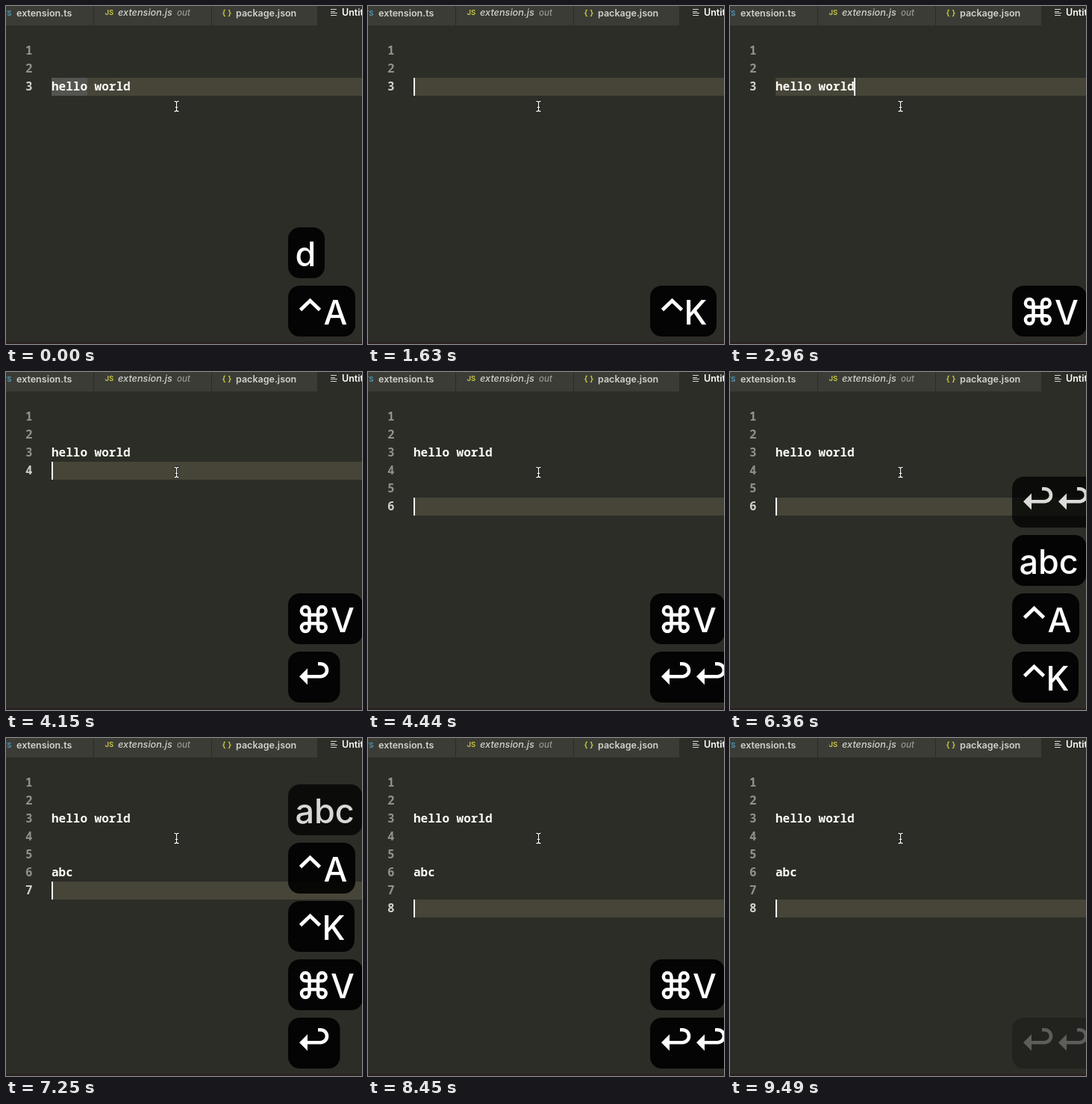
Write an HTML page that moves like this. It is 477x452 px and loops after 9590 ms.

```html
<!DOCTYPE html>
<html lang="en">
<head>
<meta charset="utf-8">
<title>Editor key demo</title>
<style>
  html, body { margin: 0; width: 100%; height: 100%; overflow: hidden; background: #2c2d27; }
  svg { display: block; width: 477px; height: 452px; }
  text { white-space: pre; }
  .tab { font: 600 12.5px Inter, "Open Sans", sans-serif; fill: #d2d2cd; }
  .slant { font-style: italic; font-weight: 500; font-size: 12.7px; }
  .dim { font-size: 11.5px; fill: #989993; }
  .icon { font: 600 9.5px Inter, sans-serif; }
  .code { font: 600 16px "Noto Sans Mono", "DejaVu Sans Mono", monospace; fill: #fbfbf5; }
  .num { fill: #90918b; text-anchor: end; }
  .num.on { fill: #d0d0cb; }
  .key { font: 500 45px Inter, "Open Sans", sans-serif; fill: #fff; }
  .line { fill: none; stroke: #fff; }
</style>
</head>
<body>
<svg viewBox="0 0 477 452" xmlns="http://www.w3.org/2000/svg">
  <defs>
    <path id="beam" d="M225.8 127.3q2.7 0 2.7 2q0-2 2.7-2M228.5 129V139M225.8 140.9q2.7 0 2.7-2q0 2 2.7 2M227 135.5h3"/>
  </defs>
  <rect width="477" height="452" fill="#2c2d27"/>
  <rect width="417" height="26" fill="#3b3c36"/>
  <path d="M117.5 0V26M275.5 0V26M417.5 0V26" stroke="#2a2b26"/>
  <text class="icon" x="7.5" y="12.5" fill="#519aba" text-anchor="end">TS</text>
  <text class="tab" x="14" y="14">extension.ts</text>
  <text class="icon" x="132.5" y="12" fill="#cbcb41">JS</text>
  <text class="tab slant" x="150" y="13">extension.js</text>
  <text class="tab slant dim" x="229" y="13">out</text>
  <text class="icon" x="289.5" y="12.5" fill="#cbcb41" style="font-size:11px">{ }</text>
  <text class="tab" x="308" y="14">package.json</text>
  <path d="M435 4.5h8M435 7.5h6M435 9.5h9M435 12.5h8" stroke="#d4d7d6"/>
  <text class="tab" x="450" y="13" style="fill:#fff">Untitled-1</text>

  <rect id="row" x="61" width="416" height="24" fill="#464538"/>
  <rect id="word" x="61" y="96" width="48" height="24" fill="#545550"/>
  <g id="nums"></g>
  <text id="hello" class="code" x="61" y="113">hello world</text>
  <text id="abc" class="code" x="61" y="185"></text>
  <rect id="caret" width="2" height="24" fill="#fffff8"/>
  <rect y="449" width="477" height="3" fill="#2b2321"/>
  <g fill="none" stroke-linecap="round">
    <use href="#beam" stroke="#151612" stroke-width="3"/>
    <use href="#beam" stroke="#fff" stroke-width="1.2"/>
  </g>
  <g id="keys"></g>
</svg>
<script>
const LOOP = 9590, ROW = 24, CHAR = 9.6;
const $ = id => document.getElementById(id);

function add(parent, tag, attrs, text) {
  const el = document.createElementNS('http://www.w3.org/2000/svg', tag);
  for (const k in attrs) el.setAttribute(k, attrs[k]);
  if (text) el.textContent = text;
  parent.appendChild(el);
  return el;
}
const show = (el, on) => el.setAttribute('visibility', on ? 'visible' : 'hidden');
const rowTop = n => 48 + ROW * (n - 1);

// Key glyphs, relative to the top left corner of their box
const letters = (g, x, s) => add(g, 'text', { class: 'key', x, y: 51.7 }, s);

function control(g, letter) {
  add(g, 'path', { class: 'line', d: 'M16.5 32.5L29.5 20L42.5 32.5', 'stroke-width': 4.8 });
  letters(g, letter === 'K' ? 45.5 : 47.5, letter);
}

function command(g) {
  const h = 5.8, r = 5.3, e = h + r, arc = `A${r} ${r} 0 1 1 `;
  const d = `M${h} 0V${-e}${arc}${e} ${-h}H${-e}${arc}${-h} ${-e}V${e}${arc}${-e} ${h}H${e}${arc}${h} ${e}Z`;
  add(g, 'path', { class: 'line', d, 'stroke-width': 4.5, transform: 'translate(34.3 34.5)' });
  letters(g, 57, 'V');
}

function returns(g, count) {
  for (let i = 0; i < count; i++) {
    const a = add(g, 'g', { transform: `translate(${47 * i} -0.8)` });
    add(a, 'path', { fill: '#fff', d: 'M15 34L26 23V45Z' });
    add(a, 'path', { class: 'line', d: 'M24 34H43.5a8.5 8.5 0 0 0 0-17H40', 'stroke-width': 4.6 });
  }
}

const ctrlA = [90, g => control(g, 'A')];
const ctrlK = [89, g => control(g, 'K')];
const cmdV = [100, command];
const enter = n => [22.5 + 47 * n, g => returns(g, n)];
const typed = (w, s) => [w, g => letters(g, 9.5, s)];

// looks: [time, [width, draw]]; fade: two dimming steps, then gone
const groups = [
  { looks: [[0, typed(49, 'd')]], fade: [150, 150, 290] },
  { looks: [[0, ctrlA]], fade: [1480, 1480, 1630] },
  { looks: [[730, ctrlK]], fade: [2670, 2820, 2960] },
  { looks: [[2960, cmdV]], fade: [4880, 5030, 5180] },
  { looks: [[4150, enter(1)], [4290, enter(2)], [4440, enter(3)]], fade: [6360, 6510, 6660] },
  { looks: [[5030, typed(47, 'a')], [5180, typed(75, 'ab')], [5330, typed(99.5, 'abc')]], fade: [7250, 7400, 7550] },
  { looks: [[5920, ctrlA]], fade: [7700, 7850, 8000] },
  { looks: [[6070, ctrlK]], fade: [7850, 8000, 8150] },
  { looks: [[6660, cmdV]], fade: [8590, 8740, 8890] },
  { looks: [[7250, enter(1)], [7400, enter(2)]], fade: [9490, 9490, LOOP] }
];
const levels = [1, 0.81, 0.23, 0];

for (const group of groups) {
  group.el = add($('keys'), 'g', {});
  group.views = group.looks.map(([, [width, draw]]) => {
    const g = add(group.el, 'g', {});
    add(g, 'rect', { width, height: 68, rx: 15.5, fill: '#000', 'fill-opacity': 0.9 });
    draw(g);
    return g;
  });
}

const nums = [1, 2, 3, 4, 5, 6, 7, 8].map(n =>
  add($('nums'), 'text', { x: 35.5, y: rowTop(n) + 17 }, String(n)));

// Caret: [time, row, column]
const moves = [
  [0, 3, 0], [2960, 3, 11], [4150, 4, 0], [4290, 5, 0], [4440, 6, 0],
  [5030, 6, 1], [5180, 6, 2], [5330, 6, 3], [5920, 6, 0], [6660, 6, 3],
  [7250, 7, 0], [7400, 8, 0]
];
const blinks = [590, 1180, 1630, 2230, 2670, 3410, 4000, 4880, 5030, 5780,
  5920, 6510, 6660, 7110, 7250, 8000, 8450, 9040, 9490];

const passed = (times, t) => times.filter(x => x <= t).length;

function render(t) {
  const [, row, col] = moves[passed(moves.map(m => m[0]), t) - 1];
  $('row').setAttribute('y', rowTop(row));
  $('caret').setAttribute('x', 61 + Math.floor(col * CHAR));
  $('caret').setAttribute('y', rowTop(row));
  show($('caret'), passed(blinks, t) % 2);
  show($('word'), t < 730);
  show($('hello'), t < 730 || t >= 2960);
  const cut = t >= 6070 && t < 6660;
  $('abc').textContent = cut ? '' : 'abc'.slice(0, passed([5030, 5180, 5330], t));
  nums.forEach((el, i) => {
    show(el, i < row);
    el.setAttribute('class', i + 1 === row ? 'code num on' : 'code num');
  });

  const started = passed(groups.map(g => g.looks[0][0]), t);
  groups.forEach((group, i) => {
    const look = passed(group.looks.map(l => l[0]), t) - 1;
    const level = look < 0 ? 0 : levels[passed(group.fade, t)];
    group.el.setAttribute('opacity', level);
    group.el.setAttribute('transform', `translate(378 ${374 - 78 * (started - 1 - i)})`);
    group.views.forEach((v, k) => v.setAttribute('display', k === look ? 'inline' : 'none'));
  });
}

function tick() {
  render(performance.now() % LOOP);
  requestAnimationFrame(tick);
}
tick();
</script>
</body>
</html>
```
